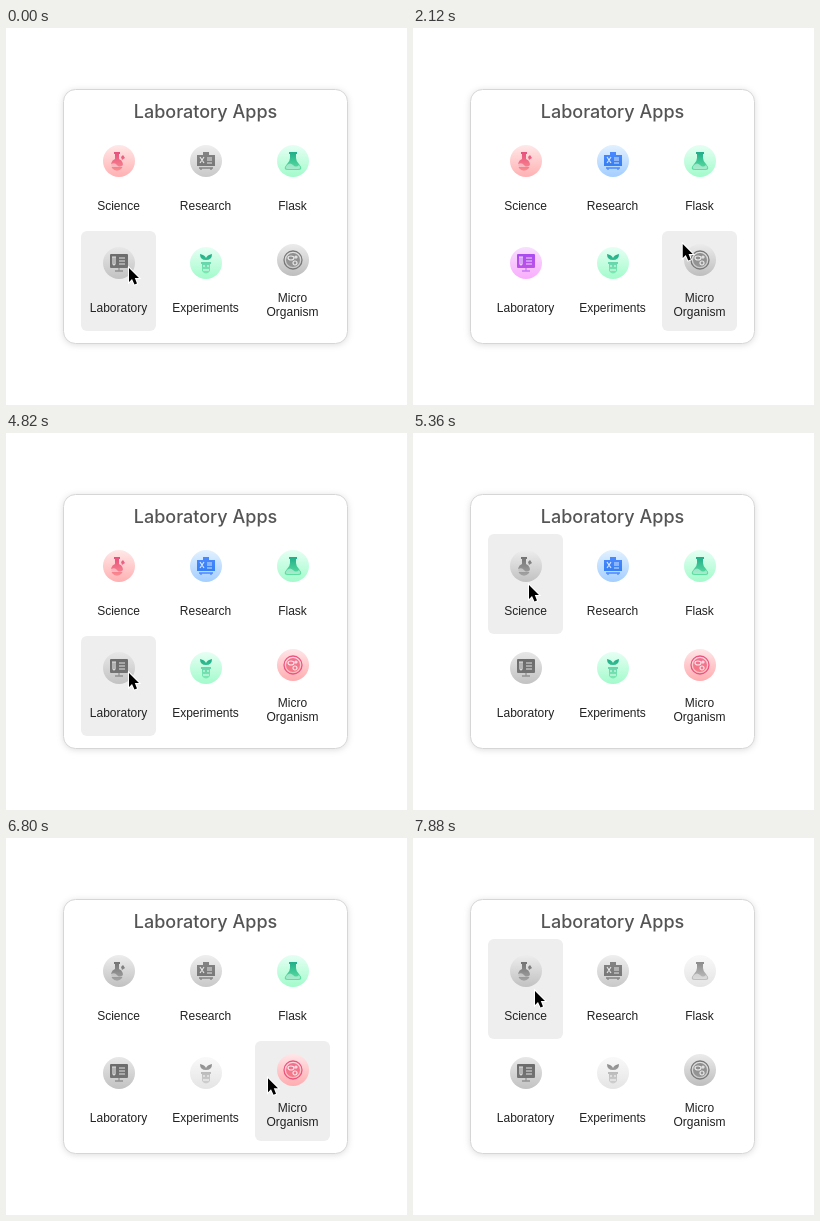
These frames come from a looping animation (401x377 px, 8000 ms). An HTML page:

```html
<!DOCTYPE html>
<html lang="en">
<head>
<meta charset="utf-8">
<title>Laboratory Apps</title>
<style>
  html, body { margin: 0; width: 100%; height: 100%; overflow: hidden; background: #fff; }
  svg { display: block; }
  text { text-anchor: middle; }
  .card { fill: #fff; stroke: #d6d6d6; filter: drop-shadow(0 1px 3px #0002); }
  .title { font: 500 18px Inter, sans-serif; fill: #555; }
  .label { font: 12px "Liberation Sans", Arial, sans-serif; fill: #222; }
  .tile { fill: #eee; }
  .off { filter: grayscale(1); }
  .line { fill: none; stroke: currentColor; stroke-width: 1.3; }
  .pale { fill: #fff; fill-opacity: .45; }
  .cut { fill: none; stroke: #fff; stroke-opacity: .8; stroke-width: 1.2; }
  #pointer { stroke: #fff; stroke-width: 2; paint-order: stroke; }
</style>
</head>
<body>
<svg id="stage" width="401" height="377" viewBox="0 0 401 377">
  <rect class="card" x="57.5" y="61.5" width="284" height="254" rx="12"/>
  <text class="title" x="199.5" y="90">Laboratory Apps</text>
</svg>
<script>
const LOOP = 8000, STEP = 180, OFFSET = 140;
const TILE = { x: 75, y: 101, w: 75, h: 100, dx: 87, dy: 102 };
const stage = document.getElementById('stage');
const add = markup => stage.insertAdjacentHTML('beforeend', markup);

const green = ['#20ad88', '#5fe0a2'], mint = ['#e6fff4', '#a2fbcb'];
const apps = [
  { name: 'Science', on: true, ink: ['#e64f7c', '#f98a90'], sky: ['#ffe8e8', '#ffb0b2'],
    art: `<path d="M-5-9H1V-7H0V-2A6 6 0 1 1-4-2V-7H-5Z"/><path d="M2-4L4-6L6-3L3-1Z"/>
      <path class="pale" d="M-8 3Q-4 1-2 4T4 4V6H-8Z"/>` },
  { name: 'Research', on: false, ink: ['#4a88ff', '#2f7df0'], sky: ['#e2f1ff', '#a3ceff'],
    art: `<path d="M-9-6H-3V-9H3V-6H9V5H-9Z"/><path class="cut" d="M-6-4L-2 2M-2-4L-6 2M1-3H6M1-1H6M1 2H6"/>
      <path class="line" d="M-7 7H7M-5 7V9M5 7V9"/>` },
  { name: 'Flask', on: true, ink: green, sky: mint,
    art: `<path d="M-4-9H4V-7H3V-3Q3 0 6 3Q11 9 5 9H-5Q-11 9-6 3Q-3 0-3-3V-7H-4Z"/>
      <path class="pale" d="M-6 4Q-3 1 0 4T6 4Q9 8 5 8H-5Q-9 8-6 4Z"/>` },
  { name: 'Laboratory', on: false, ink: ['#a94cf0', '#c452e6'], sky: ['#f8e0ff', '#f9acfc'],
    art: `<rect x="-9" y="-9" width="18" height="14" rx="1"/>
      <path class="cut" d="M-7-6H-3M-6-6V1Q-5 3-4 1V-6M0-5H6M0-2H6M0 1H6"/>
      <path class="line" opacity=".6" d="M0 5V8M-4 8H4"/>` },
  { name: 'Experiments', on: true, ink: green, sky: mint,
    art: `<path d="M0-3Q-6-3-6-9Q-1-8 0-5Q1-8 6-9Q6-3 0-3Z"/>
      <path opacity=".7" d="M-5-1H5V1H4V8Q0 13-4 8V1H-5Z"/><path class="pale" d="M-3 2H-1V4H-3ZM1 2H3V4H1ZM-3 6H3V8H-3Z"/>` },
  { name: 'Micro Organism', on: false, ink: ['#ea5580', '#f46c78'], sky: ['#ffe6e8', '#ffacb0'],
    art: `<circle class="line" r="9"/><circle r="7" opacity=".8"/><ellipse class="cut" cx="-2" cy="-2" rx="3" ry="2"/>
      <circle class="cut" cx="3" cy="-3" r="1"/><circle class="cut" cx="2" cy="3" r="2"/>` },
];

// Pointer visits in steps: it rests at x, y from `arrive` to `leave`; a click flips the tile below it.
const visits = [
  { arrive: 0,  leave: 2,  x: 123, y: 240, click: 2 },
  { arrive: 6,  leave: 8,  x: 203, y: 150, click: 7 },
  { arrive: 12, leave: 14, x: 292, y: 238, click: 14 },
  { arrive: 15, leave: 15, x: 294, y: 303, exit: true },
  { arrive: 23, leave: 23, x: 117, y: 303 },
  { arrive: 24, leave: 26, x: 123, y: 240, click: 26 },
  { arrive: 28, leave: 29, x: 116, y: 152, click: 29 },
  { arrive: 31, leave: 31, x: 203, y: 150, click: 31 },
  { arrive: 33, leave: 35, x: 210, y: 245, click: 35 },
  { arrive: 38, leave: 38, x: 288, y: 238, click: 38 },
  { arrive: 40, leave: 41, x: 286, y: 147, click: 41 },
  { arrive: 42, leave: 42, x: 205, y: 206 },
  { arrive: 43, leave: 44, x: 122, y: 153 },
];

const gradient = (id, [top, bottom], r) =>
  `<linearGradient id="${id}" gradientUnits="userSpaceOnUse" x1="0" x2="0" y1="${-r}" y2="${r}">
    <stop stop-color="${top}"/><stop offset="1" stop-color="${bottom}"/></linearGradient>`;

apps.forEach((app, i) => {
  app.x = TILE.x + TILE.dx * (i % 3);
  app.y = TILE.y + TILE.dy * Math.floor(i / 3);
  const words = app.name.split(' '), extra = words.length - 1, cx = app.x + TILE.w / 2;
  const label = words.map((word, k) =>
    `<text class="label" x="${cx}" y="${app.y + 81 - 10 * extra + 14 * k}">${word}</text>`).join('');
  add(`${gradient('sky' + i, app.sky, 16)}${gradient('ink' + i, app.ink, 9)}
    <rect class="tile" id="tile${i}" x="${app.x}" y="${app.y}" width="${TILE.w}" height="${TILE.h}" rx="6"/>
    <g id="icon${i}"><g transform="translate(${cx + .5} ${app.y + 32 - 3 * extra})">
      <circle r="16" fill="url(#sky${i})"/><g fill="url(#ink${i})" color="${app.ink[0]}">${app.art}</g>
    </g></g>${label}`);
  app.tile = document.getElementById('tile' + i);
  app.icon = document.getElementById('icon' + i);
});
add('<path id="pointer" d="M0 0V14L3 11L5.5 16.5L8 15.5L5.8 10H10Z"/>');
const pointer = document.getElementById('pointer');

const appAt = ({ x, y }) => apps.find(app =>
  x >= app.x && x < app.x + TILE.w && y >= app.y && y < app.y + TILE.h);

function pointerAt(step) {
  const i = visits.findLastIndex(visit => visit.arrive <= step);
  const a = visits[i], b = visits[i + 1];
  if (step <= a.leave) return a;
  if (a.exit) return null;
  const k = (step - a.leave) / (b.arrive - a.leave);
  return { x: a.x + (b.x - a.x) * k, y: a.y + (b.y - a.y) * k };
}

function draw(time) {
  const step = Math.max(0, Math.floor((time % LOOP - OFFSET) / STEP));
  const spot = pointerAt(step), hovered = spot && appAt(spot);
  const clicked = visits.filter(visit => visit.click <= step).map(appAt);
  pointer.style.display = spot ? '' : 'none';
  if (spot) pointer.setAttribute('transform', `translate(${spot.x} ${spot.y})`);
  for (const app of apps) {
    const flipped = clicked.filter(hit => hit === app).length % 2 === 1;
    app.icon.classList.toggle('off', app.on === flipped);
    app.tile.style.display = app === hovered ? '' : 'none';
  }
}

const start = performance.now();
function tick() {
  draw(performance.now() - start);
  requestAnimationFrame(tick);
}
tick();
</script>
</body>
</html>
```
